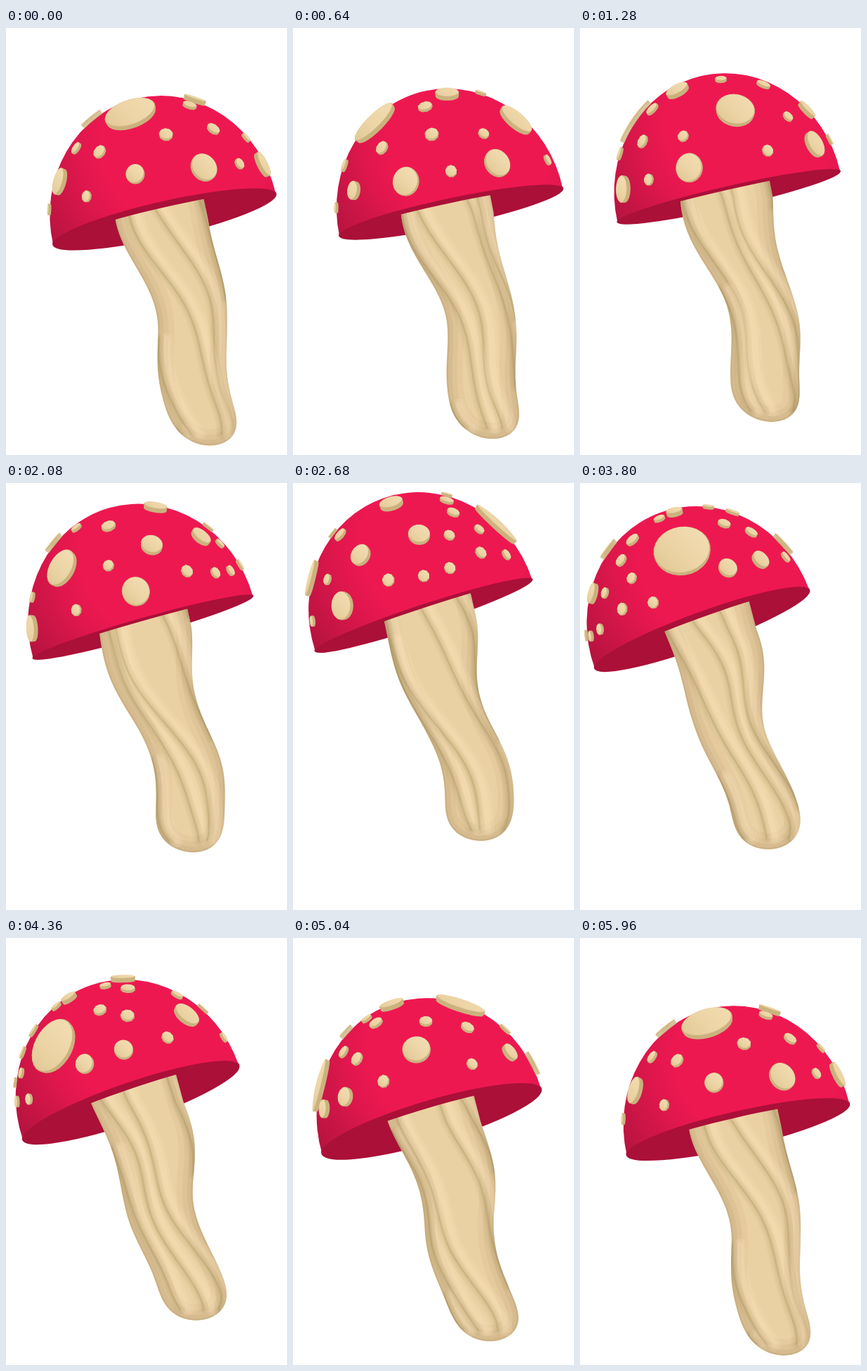
An HTML page with a canvas for the animation above (6 s loop, 400 px wide and 606 px high).

```html
<!DOCTYPE html>
<html lang="en">
<head>
<meta charset="utf-8">
<title>Turning toadstool</title>
<style>
  html, body { margin: 0; width: 100%; height: 100%; overflow: hidden; background: #fff; }
  canvas { display: block; }
</style>
</head>
<body>
<canvas id="stage" width="400" height="606"></canvas>
<script>
const ctx = document.getElementById('stage').getContext('2d');
const LOOP = 6000, STEP = 40, TURN = Math.PI * 2, DEG = Math.PI / 180;
const RADIUS = 162.5, HEIGHT = 175.5;   // cap size in pixels
const EYE = 5.5;                        // camera distance in cap radii
const K = Math.sqrt(EYE * EYE - 1), LIMB = 1 / EYE;
const { sin, cos } = Math;

// Rings of spots in degrees: angle from the crown, spot radius, longitudes.
const RINGS = [
  [28, 5.6, [297]],
  [33, 3.6, [240]],
  [34, 2.5, [92, 226, 273]],
  [35, 5.2, [55, 164]],
  [41, 11.6, [353]],
  [43, 3.1, [36, 121, 204, 285]],
  [53, 2.7, [197, 262, 315]],
  [58, 8.1, [90]],
  [61, 2.8, [10, 37, 274, 335]],
  [61, 4.4, [140, 171]],
  [61, 12, [232]],
  [65, 2.2, [62, 117, 185, 204]],
  [67, 5.7, [305]],
  [76, 2.4, [151, 196, 287]],
  [76, 3.7, [248, 266, 352]],
  [79, 5.5, [22, 63, 126]],
  [79, 2.2, [42, 98, 166, 178, 212, 327]]
];
const spots = RINGS.flatMap(([polar, size, lons]) =>
  lons.map(lon => ({ polar: polar * DEG, size: size * DEG, lon: lon * DEG })));

// The tilted body wobbles once per turn, with a slight second harmonic.
function poseAt(spin) {
  const wave = (mid, c, s, c2 = 0) => mid + c * cos(spin) + s * sin(spin) + c2 * cos(2 * spin);
  const x = wave(198.5, 22, 13, 5), y = wave(231.5, 42.5, -5, -3);
  const tilt = wave(16, -3.2, -2.5) * DEG;
  const rim = wave(21, 4, -7.5);
  const lean = Math.asin(rim * .66 / RADIUS);
  return { spin, x, y, rim, tilt, cos: cos(tilt), sin: sin(tilt),
    cosLean: cos(lean), sinLean: sin(lean),
    top: x + wave(3, -7, -5), footX: wave(275, 11, -1, 4), footY: wave(549, 43.5, 0) };
}

// Cap surface point to screen; points behind the outline slide onto it.
function project(p, [X, Y, Z], lift) {
  let x = X, y = Y * p.cosLean + Z * p.sinLean, z = Z * p.cosLean - Y * p.sinLean;
  if (z < LIMB) {
    const f = Math.sqrt(1 - LIMB * LIMB) / Math.hypot(x, y);
    x *= f; y *= f; z = LIMB;
  }
  const s = K / (EYE - z) * lift;
  x *= s * RADIUS; y *= s * HEIGHT;
  return [p.x + x * p.cos - y * p.sin, p.y - x * p.sin - y * p.cos];
}

function polygon(points) {
  ctx.beginPath();
  points.forEach(([x, y]) => ctx.lineTo(x, y));
  ctx.closePath();
}

function drawSpot(p, { lon, polar, size }) {
  const l = lon - p.spin;
  const sl = sin(l), cl = cos(l), sp = sin(polar), cp = cos(polar);
  const mid = [sp * sl, cp, sp * cl], east = [cl, 0, -sl], south = [cp * sl, -sp, cp * cl];
  const depth = mid[2] * p.cosLean - mid[1] * p.sinLean;
  if (depth < LIMB - size * .85) return;
  const small = size < .06, sides = small ? 9 : 28, wall = small ? .022 : .036;
  const ring = (grow, lift) => Array.from({ length: sides }, (_, i) => {
    const a = i / sides * TURN, s = sin(size * grow), c = cos(size * grow);
    return project(p, mid.map((m, j) => m * c + s * (cos(a) * east[j] + sin(a) * south[j])), lift);
  });
  const paint = (points, color, width) => {
    ctx.fillStyle = ctx.strokeStyle = color;
    ctx.lineWidth = width;
    polygon(points);
    ctx.fill();
    ctx.stroke();
  };
  ctx.lineJoin = 'round';
  for (const part of [0, .3, .6, .85]) paint(ring(1, 1 + wall * part), '#cbb27e', 1.4);

  const [x, y] = project(p, mid, 1 + wall), r = size * RADIUS;
  const g = ctx.createLinearGradient(x - r, y + r, x + r, y - r);
  g.addColorStop(0, '#dfc793');
  g.addColorStop(.45, '#ecd4a6');
  g.addColorStop(1, '#f3ddb2');
  paint(ring(.97, 1 + wall), g, .8);
}

// Stem centre line: straight lean plus a bend that winds round the axis.
function spine(p, h) {
  const bend = 10 * h + 14 * cos(p.spin - h * TURN + 110 * DEG);
  return p.top + (p.footX - p.top) * h + Math.max(0, sin(Math.PI * h)) * bend;
}

// Half width: flares under the cap, rounds off at the foot.
function girth(h) {
  const u = Math.min(1, Math.max(0, h / .5));
  const end = Math.max(0, (h - .8) / .2);
  return (66 - 17 * u * u * (3 - 2 * u)) * Math.sqrt(Math.max(0, 1 - end ** 3));
}

function stemPoint(p, h, side) {
  return [spine(p, h) + side * girth(h), p.y + h * (p.footY - p.y)];
}

function softStroke(color, layers) {
  ctx.strokeStyle = color;
  for (const [width, alpha] of layers) {
    ctx.globalAlpha = alpha;
    ctx.lineWidth = width;
    ctx.stroke();
  }
  ctx.globalAlpha = 1;
}

function drawStem(p) {
  const rows = Array.from({ length: 101 }, (_, i) => 1 - (i / 100) ** 2 * 1.18);
  ctx.save();
  ctx.lineCap = ctx.lineJoin = 'round';
  polygon([...rows.map(h => stemPoint(p, h, 1)), ...rows.reverse().map(h => stemPoint(p, h, -1))]);
  ctx.fillStyle = '#ead1a3';
  ctx.fill();
  ctx.clip();
  softStroke('#94794a', [[46, .07], [30, .08], [16, .1], [5, .15]]);

  // Twisted folds turning with the cap.
  const folds = 7;
  for (let f = 0; f < folds; f++) {
    const start = (f + .3 * sin(f * 2.3)) / folds * TURN - p.spin;
    const trace = shift => {
      let pen = false;
      ctx.beginPath();
      for (let h = -.15; h < .96; h += .02) {
        const a = start + h * 1.3 + .15 * sin(h * 6 + f * 1.7);
        if (cos(a) < .1) { pen = false; continue; }
        const [x, y] = stemPoint(p, h, sin(a));
        if (pen) ctx.lineTo(x + shift, y); else ctx.moveTo(x + shift, y);
        pen = true;
      }
    };
    trace(12);
    softStroke('#fde3bf', [[18, .16], [9, .2]]);
    trace(0);
    softStroke('#917a48', [[15, .07], [9, .08], [4, .12], [1.2, .2]]);
  }
  ctx.restore();
}

function fillRim(p, from, to, color) {
  ctx.beginPath();
  ctx.ellipse(p.x, p.y, RADIUS, from, -p.tilt, Math.PI, TURN);
  ctx.ellipse(p.x, p.y, RADIUS, p.rim * to, -p.tilt, TURN, Math.PI, true);
  ctx.closePath();
  ctx.fillStyle = color;
  ctx.fill();
}

function drawUnderside(p) {
  ctx.beginPath();
  ctx.ellipse(p.x, p.y, RADIUS, p.rim, -p.tilt, 0, TURN);
  ctx.fillStyle = ctx.strokeStyle = '#aa1038';
  ctx.lineWidth = 2;
  ctx.fill();
  ctx.stroke();
}

function drawDome(p) {
  const x = p.x + 28, y = p.y - 105;
  const g = ctx.createRadialGradient(x, y, 115, x, y, 245);
  g.addColorStop(0, '#ee1851');
  g.addColorStop(.25, '#e2174d');
  g.addColorStop(1, '#b0133e');
  fillRim(p, p.rim + 1, .65, '#aa1038');   // near lip in front of the stem
  fillRim(p, HEIGHT, 1, g);
}

function frame() {
  const t = Math.floor(performance.now() / STEP) * STEP % LOOP;
  const p = poseAt(t / LOOP * TURN);
  ctx.fillStyle = '#fff';
  ctx.fillRect(0, 0, 400, 606);
  drawUnderside(p);
  drawStem(p);
  drawDome(p);
  spots.forEach(s => drawSpot(p, s));
  requestAnimationFrame(frame);
}
frame();
</script>
</body>
</html>
```
